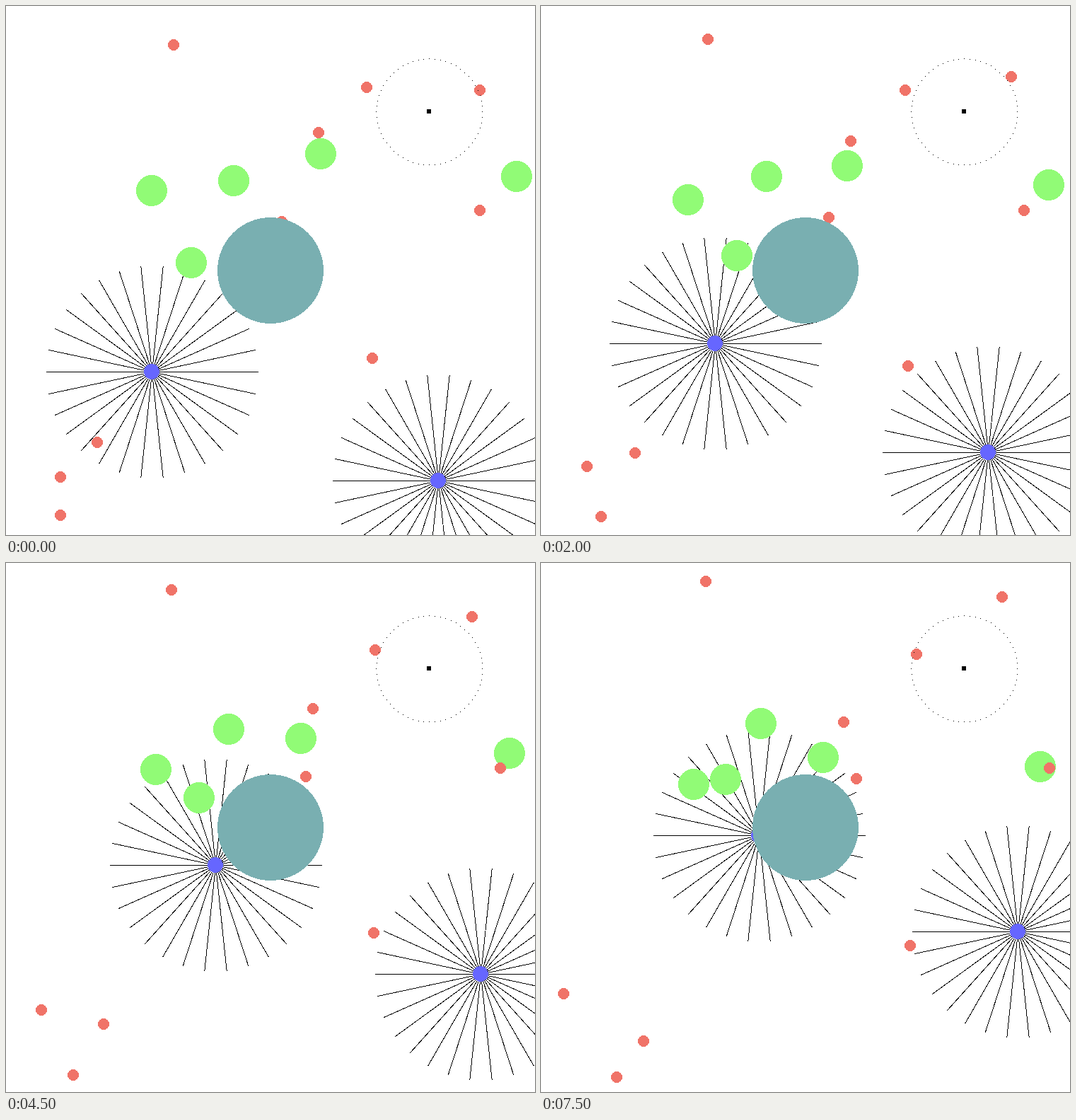
Recreate the animation shown at these times as an HTML page. Size 748 px wide and 748 px high, loop 8000 ms.

```html
<!DOCTYPE html>
<html>
<head>
<meta charset="utf-8">
<style>
html, body { margin: 0; width: 100%; height: 100%; overflow: hidden; background: #fff }
svg { display: block }
</style>
</head>
<body>
<svg width="748" height="748" viewBox="0 0 748 748" shape-rendering="crispEdges"></svg>
<script>
const STEP = 500, STEPS = 16;
const svg = document.querySelector('svg');
const movers = [];

function add(parent, tag, attrs) {
  const el = document.createElementNS('http://www.w3.org/2000/svg', tag);
  for (const key in attrs) el.setAttribute(key, attrs[key]);
  return parent.appendChild(el);
}

// A path is a list of [step, x, y] points joined by straight moves
const line = (x0, y0, x1, y1) => [[0, x0, y0], [STEPS - 1, x1, y1]];

function place(path, step) {
  const i = Math.max(1, path.findIndex(p => p[0] >= step));
  const [s0, x0, y0] = path[i - 1], [s1, x1, y1] = path[i];
  const k = (step - s0) / (s1 - s0);
  return [x0 + (x1 - x0) * k, y0 + (y1 - y0) * k];
}

function mover(path) {
  const el = add(svg, 'g', {});
  movers.push({ el, path });
  return el;
}

function star(path) {
  const g = mover(path);
  for (let a = 0; a < 360; a += 12) {
    const r = a * Math.PI / 180;
    add(g, 'line', {
      x1: 0, y1: 0, x2: 150 * Math.cos(r), y2: 150 * Math.sin(r),
      stroke: '#000', transform: 'translate(.5 .5)'
    });
  }
  add(g, 'circle', { r: 11, fill: '#6666ff' });
}

const ball = (r, fill) => path => add(mover(path), 'circle', { r, fill });

[
  [[0, 206, 517], [9, 296, 427], [10, 304.6, 420], [11, 305, 414], [15, 308, 385]],
  [[0, 611, 671], [2, 618.3, 651], [3, 624, 641], [5, 639, 621], [7, 658, 601],
    [9, 671, 581], [11, 679, 561], [13, 680, 541], [15, 674, 521]]
].forEach(star);

[
  line(205.5, 260.5, 215.5, 312.5),
  line(322, 246.5, 311, 226.5),
  line(445, 208.5, 399, 274.5),
  line(722, 240.5, 706, 287.5),
  [[0, 262, 363], [5, 281.3, 350], [15, 261, 306]]
].forEach(ball(22, '#91fb76'));

[
  line(237, 55.3, 232.5, 26),
  line(509.7, 114.7, 530.7, 129),
  line(670, 119, 652, 48),
  line(442, 178.5, 428, 224.5),
  line(670, 289.2, 719, 290),
  [[0, 390, 305], [3, 403, 299], [5, 410, 299.4], [15, 446, 305.4]],
  line(517.7, 497.5, 521.7, 540.5),
  line(128.8, 616.5, 144.7, 675.5),
  line(77, 666.3, 32, 609.3),
  line(77, 720, 107, 727)
].forEach(ball(8, '#f07368'));

add(svg, 'circle', { cx: 374, cy: 374, r: 75, fill: '#79afb1' });

// Ring of dots around a small square
for (let a = 0; a < 360; a += 6) {
  const r = a * Math.PI / 180;
  add(svg, 'rect', {
    x: Math.round(598.3 + 75 * Math.cos(r)), y: Math.round(149.3 + 75 * Math.sin(r)),
    width: 1, height: 1
  });
}
add(svg, 'rect', { x: 595, y: 146, width: 6, height: 6 });

const start = performance.now();

function frame() {
  const step = Math.floor((performance.now() - start) / STEP) % STEPS;
  for (const { el, path } of movers) {
    const [x, y] = place(path, step).map(v => Math.round(v));
    el.setAttribute('transform', `translate(${x} ${y})`);
  }
  requestAnimationFrame(frame);
}
frame();
</script>
</body>
</html>
```
